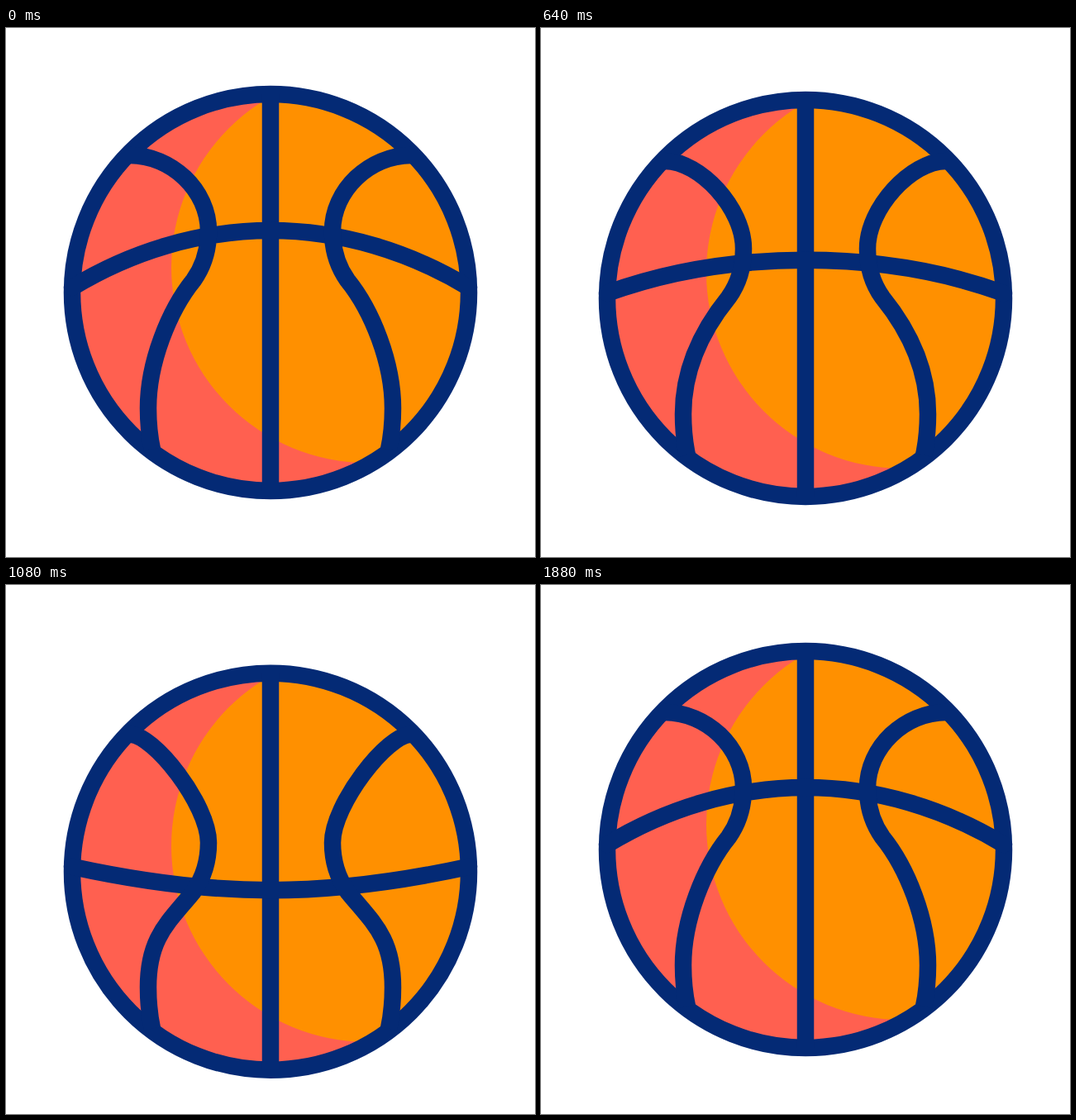
An HTML page that plays this animation: 640 by 640 pixels, repeating every 2 s.

```html
<!DOCTYPE html>
<html>
<head>
<meta charset="utf-8">
<style>
  html, body { margin: 0; width: 100%; height: 100%; overflow: hidden; background: #fff; }
  svg { display: block; width: 100%; height: 100%; }
</style>
</head>
<body>
<svg viewBox="0 0 640 640">
  <clipPath id="disc"><circle cx="320" r="240"/></clipPath>
  <g id="ball">
    <g clip-path="url(#disc)">
      <circle cx="320" r="240" fill="#ff6050"/>
      <circle cx="437" cy="-31" r="237" fill="#ff9000"/>
    </g>
    <g fill="none" stroke="#042a75" stroke-width="20.5">
      <circle cx="320" r="240"/>
      <path d="M320-240V240"/>
      <path id="equator" stroke-linecap="round"/>
      <path id="seam"/>
      <use href="#seam" transform="matrix(-1 0 0 1 640 0)"/>
    </g>
  </g>
</svg>
<script>
const LOOP = 2000, STEP = 40;
const $ = id => document.getElementById(id);
const mix = (a, b, p) => a + (b - a) * p;
const smooth = p => p * p * (3 - 2 * p);

// y: ball centre, mid: height of the equator's middle, sag: shift of the side seams' waist
const rest = { y: 320, mid: -75, sag: 0 };
const leap = { y: 263.8, mid: -106, sag: -14.5 };
const drop = { y: 366, mid: 15.5, sag: 36 };
const hop = { y: 305.7, mid: -79.5, sag: 2 };
const land = { y: 345.6, mid: 22, sag: 26 };
const settled = { y: 346.7, mid: 22.5, sag: 39 };

const moves = [
  { from: rest, to: leap, start: 80, end: 280 },
  { from: leap, to: drop, start: 280, end: 520 },
  { from: drop, to: hop, start: 520, end: 720 },
  { from: hop, to: land, start: 720, end: 960 },
  { from: land, to: settled, start: 960, end: 1080 },
  { from: settled, to: rest, start: 1480, end: 1880 },
];

function poseAt(t) {
  const { from, to, start, end } = moves.findLast(move => move.start <= t) || moves[0];
  const p = smooth(Math.min(1, Math.max(0, (t - start) / (end - start))));
  return { y: mix(from.y, to.y, p), mid: mix(from.mid, to.mid, p), sag: mix(from.sag, to.sag, p) };
}

function equatorPath(mid) {
  const shoulder = 0.61 * mid - 4;
  return `M80-6C152 ${shoulder} 235 ${mid} 320 ${mid}S488 ${shoulder} 560-6`;
}

function seamPath(sag) {
  return `M150-166C${200 - 0.55 * sag}-166 245 ${-124 + 1.1 * sag} 245 ${-74 + sag}` +
    `C245 ${-51 + sag} 239 ${-32 + sag} 227 ${-15 + sag}` +
    `C197 ${22 + sag} 172 ${85 - 0.15 * sag} 172 140C172 160 174 176 177 190`;
}

function draw(now) {
  const pose = poseAt(Math.floor((now % LOOP) / STEP) * STEP);
  $("ball").setAttribute("transform", `translate(0 ${pose.y})`);
  $("equator").setAttribute("d", equatorPath(pose.mid));
  $("seam").setAttribute("d", seamPath(pose.sag));
  requestAnimationFrame(draw);
}
draw(performance.now());
</script>
</body>
</html>
```
